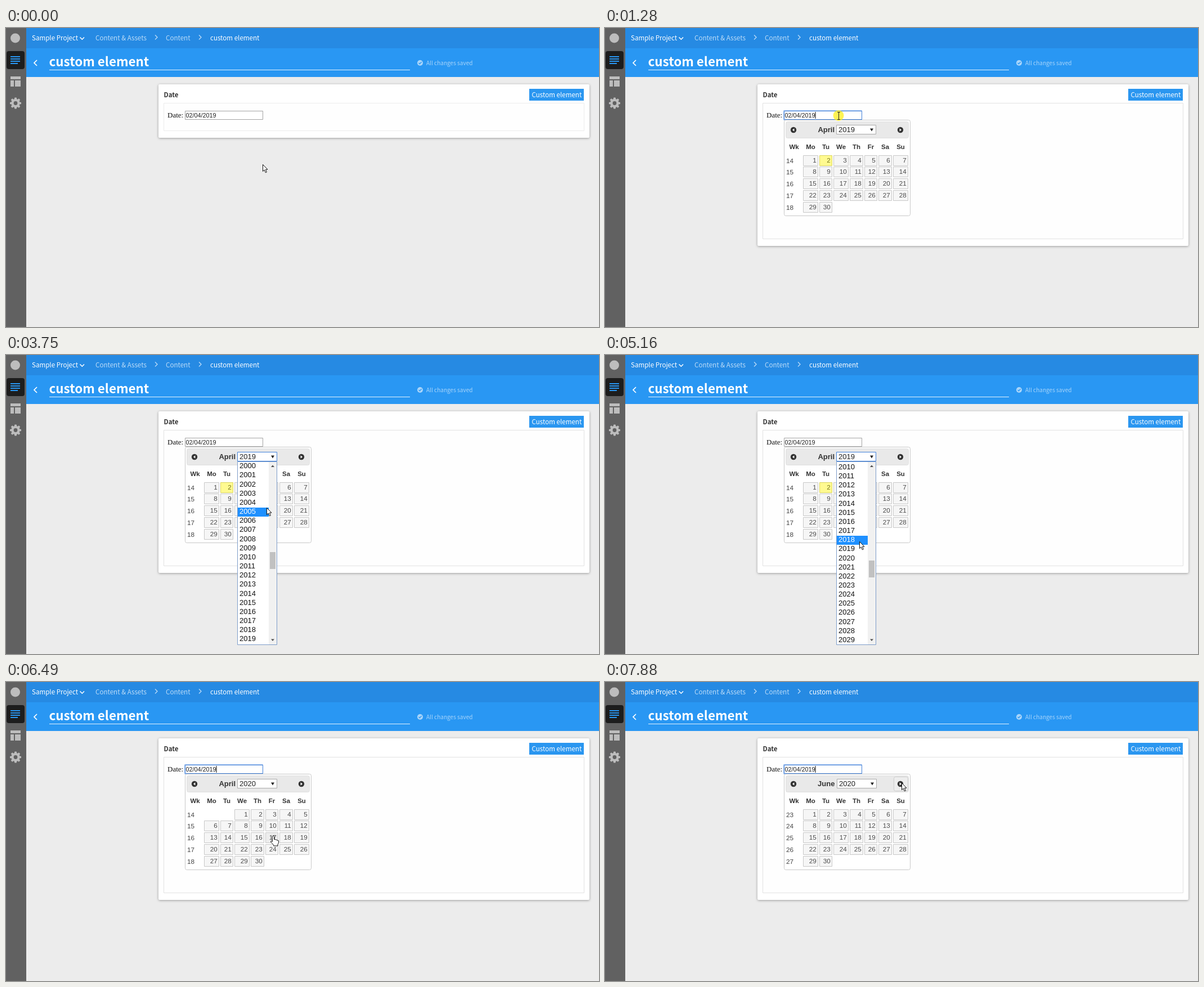
An HTML page with a canvas for the animation above (8 s loop, 1054 by 531 pixels).

```html
<!DOCTYPE html>
<html lang="en">
<head>
<meta charset="utf-8">
<title>Date picker</title>
<style>
html, body { margin: 0; width: 100%; height: 100%; overflow: hidden; background: #ececec; }
canvas { display: block; }
</style>
</head>
<body>
<canvas id="stage" width="1054" height="531"></canvas>
<script>
const ctx = document.getElementById('stage').getContext('2d');
const LOOP = 8000;
const UI = '"Noto Sans CJK JP", "Noto Sans CJK SC", "Noto Sans CJK", "Open Sans", sans-serif';
const ARIAL = '"Liberation Sans", Arial, sans-serif';
const SERIF = '"Liberation Serif", "Times New Roman", serif';
const BLUE = '#2997f3', FOCUS = '#3f7fd8', ICON = '#bdbdbd';

// lead: empty cells before day 1, week: first week number
const MONTHS = [
  { from: 1280, name: 'April', year: 2019, lead: 0, days: 30, week: 14, today: 2 },
  { from: 6180, name: 'April', year: 2020, lead: 2, days: 30, week: 14 },
  { from: 7580, name: 'May', year: 2020, lead: 4, days: 31, week: 18 },
  { from: 7880, name: 'June', year: 2020, lead: 0, days: 30, week: 23 }
];
// left edge, width and label of each weekday column
const COLUMNS = [[352, 27, 'Mo'], [381, 23, 'Tu'], [406, 27, 'We'], [435, 24, 'Th'],
  [461, 23, 'Fr'], [486, 24, 'Sa'], [512, 27, 'Su']];

const EASE = {
  in: p => p * p,
  out: p => p * (2 - p),
  both: p => p * p * (3 - 2 * p)
};
// time, x, y, easing on the way there
const MOUSE = [[0, 456, 242], [280, 456, 242], [1070, 415, 156, 'both'], [1130, 415, 155],
  [1980, 415, 155], [2420, 471, 177, 'both'], [3390, 471, 177], [3750, 463, 271, 'both'],
  [3930, 462, 273, 'out'], [4760, 462, 273], [5160, 452, 331, 'in'], [5480, 448, 357, 'out'],
  [5570, 449, 361, 'out'], [6180, 449, 361], [6490, 475, 273, 'in'], [6980, 527, 180, 'out'],
  [7190, 526.5, 179, 'both'], [LOOP, 526.5, 179]];
// time, duration
const CLICKS = [[1280, 100], [2690, 150], [7350, 230], [7660, 220]];

function mouseAt(t) {
  const i = MOUSE.findIndex(k => k[0] > t);
  const [t0, x0, y0] = MOUSE[i - 1], [t1, x1, y1, ease] = MOUSE[i];
  const p = EASE[ease || 'both']((t - t0) / (t1 - t0));
  return { x: x0 + (x1 - x0) * p, y: y0 + (y1 - y0) * p };
}

const inside = (m, x, y, w, h) => m.x >= x && m.x < x + w && m.y >= y && m.y < y + h;

function rect(x, y, w, h, fill) {
  ctx.fillStyle = fill;
  ctx.fillRect(x, y, w, h);
}

function box(x, y, w, h, fill, stroke, radius = 0) {
  ctx.beginPath();
  ctx.roundRect(x + .5, y + .5, w - 1, h - 1, radius);
  ctx.fillStyle = fill;
  ctx.fill();
  ctx.strokeStyle = stroke;
  ctx.lineWidth = 1;
  ctx.stroke();
}

function disc(x, y, r, fill) {
  ctx.beginPath();
  ctx.arc(x, y, r, 0, Math.PI * 2);
  ctx.fillStyle = fill;
  ctx.fill();
}

function text(s, x, y, font, color, align = 'left') {
  ctx.font = font;
  ctx.fillStyle = color;
  ctx.textAlign = align;
  ctx.fillText(s, x, y);
}

function line(points, color, width) {
  ctx.beginPath();
  points.forEach(p => ctx.lineTo(...p));
  ctx.strokeStyle = color;
  ctx.lineWidth = width;
  ctx.stroke();
}

function polygon(points, fill) {
  ctx.beginPath();
  points.forEach(p => ctx.lineTo(...p));
  ctx.fillStyle = fill;
  ctx.fill();
}

function drawSidebar() {
  rect(0, 0, 36, 531, '#616161');
  disc(16.5, 18, 8.5, ICON);
  box(1, 41, 32, 32, '#1d1d1d', '#1d1d1d', 3);
  [[50, 17], [54, 17], [58, 17], [62, 13]].forEach(([y, w]) => rect(8, y, w, 2, BLUE));
  rect(8, 86, 18, 5, ICON);
  rect(8, 93, 6, 11, ICON);
  rect(16, 93, 10, 11, ICON);
  ctx.save();
  ctx.translate(17, 133.5);
  for (let i = 0; i < 8; i++) {
    polygon([[-2.6, -6], [-1.6, -10], [1.6, -10], [2.6, -6]], ICON);
    ctx.rotate(Math.PI / 4);
  }
  ctx.beginPath();
  ctx.arc(0, 0, 5.4, 0, Math.PI * 2);
  ctx.strokeStyle = ICON;
  ctx.lineWidth = 4;
  ctx.stroke();
  ctx.restore();
}

function drawHeader() {
  rect(36, 0, 1018, 36, '#268ae3');
  rect(36, 36, 1018, 51, BLUE);
  const font = '11.6px ' + UI, pale = '#bcdcf8';
  text('Sample Project', 46, 21.5, font, '#fff');
  line([[131.5, 16.5], [135.3, 20.3], [139, 16.5]], '#fff', 1.5);
  text('Content & Assets', 159, 21.5, font, pale);
  text('Content', 284, 21.5, font, pale);
  text('custom element', 363, 21.5, font, '#fff');
  [265, 343].forEach(x => line([[x, 12.5], [x + 4, 16.5], [x, 20.5]], pale, 1.3));
  line([[55, 57], [50, 62], [55, 67]], '#fff', 1.7);
  text('custom element', 76.5, 68, 'bold 22.4px ' + UI, '#fff');
  rect(77, 74, 641, 1, '#e4f2fe');
  disc(736, 62, 5, '#a9d5fa');
  line([[733.6, 62], [735.4, 63.8], [738.6, 60.3]], BLUE, 1.3);
  text('All changes saved', 747, 66, '10.05px ' + UI, '#a9d5fa');
}

function drawCard(open, focused, caret) {
  ctx.save();
  ctx.shadowColor = 'rgba(0,0,0,.35)';
  ctx.shadowBlur = 4;
  ctx.shadowOffsetY = 1;
  ctx.beginPath();
  ctx.roundRect(271, 100, 766, open ? 287 : 95, 2);
  ctx.fillStyle = '#fff';
  ctx.fill();
  ctx.restore();
  text('Date', 280.5, 122.5, 'bold 11.4px ' + UI, '#333');
  rect(930, 108, 97, 21, '#2a96f0');
  text('Custom element', 934.5, 123, '11.6px ' + UI, '#fff');
  box(280, 133, 748, open ? 242 : 50, '#fefefe', open ? '#e2e2e2' : '#ececec');
  text('Date:', 287, 159, '13px ' + SERIF, '#111');
  if (focused) box(317, 146, 140, 18, '#fff', '#a9c6f0');
  box(318, 147, 139, 16, '#fff', focused ? FOCUS : '#a3a3a3');
  text('02/04/2019', 319.5, 158.5, '10.8px ' + ARIAL, '#222');
  if (caret) rect(373.5, 149, 1, 12, '#000');
}

function drawArrowButton(x, dir) {
  disc(x, 181, 5.2, '#333');
  polygon([[x - dir * 1.4, 178.2], [x + dir * 2, 181], [x - dir * 1.4, 183.8]], '#fff');
}

function drawCalendar(month, mouse, listOpen, selectFocused) {
  box(318, 163, 225, 171, '#fff', '#c8c8c8', 3);
  box(321, 166, 219, 30, '#e9e9e9', '#dfdfdf', 3);
  if (inside(mouse, 513, 168, 26, 26)) box(513, 168, 26, 26, '#ededed', '#cdcdcd', 3);
  drawArrowButton(335, -1);
  drawArrowButton(525, 1);

  const titleFont = 'bold 13px ' + ARIAL;
  ctx.font = titleFont;
  const nameWidth = ctx.measureText(month.name).width;
  const left = 430 - (nameWidth + 73.6) / 2;
  const selectX = Math.round(left + nameWidth + 3.2);
  text(month.name, left, 185.3, titleFont, '#333');
  box(selectX, 172, 71, 17, '#fff', selectFocused ? FOCUS : '#a9a9a9');
  text(month.year, selectX + 4, 185, '13px ' + ARIAL, '#222');
  polygon([[selectX + 60, 178.5], [selectX + 66, 178.5], [selectX + 63, 183.5]], '#222');

  const bold = 'bold 11.5px ' + ARIAL, plain = '11.7px ' + ARIAL;
  text('Wk', 336, 215, bold, '#333', 'center');
  COLUMNS.forEach(([x, w, name]) => text(name, x + w / 2, 215, bold, '#333', 'center'));
  const rowY = r => Math.round(225.6 + 20.8 * r);
  for (let r = 0; r * 7 < month.lead + month.days; r++) {
    text(month.week + r, 322, rowY(r) + 14, plain, '#444');
  }
  for (let day = 1; day <= month.days; day++) {
    const cell = day + month.lead - 1;
    const [x, w] = COLUMNS[cell % 7], y = rowY(Math.floor(cell / 7));
    const today = day === month.today;
    const hover = !listOpen && inside(mouse, x, y, w, 19);
    box(x, y, w, 19, today ? '#fffa90' : hover ? '#ededed' : '#f6f6f6', today ? '#dad55e' : '#c8c8c8');
    text(day, x + w - 3.2, y + 13.2, plain, today ? '#777620' : '#4a4a4a', 'right');
  }
}

function drawYearList(t, mouse) {
  const scroll = t < 3840 ? 0 : t < 3930 ? 80 : 160;
  const rowH = 16.16, top = 190 - scroll;
  const hovered = mouse.y >= 190 ? 2000 + Math.floor((mouse.y - top) / rowH) : 2019;
  box(411, 189, 71, 326, '#fff', '#7d9cc9');
  ctx.save();
  ctx.beginPath();
  ctx.rect(412, 190, 69, 324);
  ctx.clip();
  for (let year = 2000; year < 2031; year++) {
    const y = top + (year - 2000) * rowH;
    if (year === hovered) rect(412, Math.round(y), 56, 16, '#1e90ff');
    text(year, 415, y + 11.3, '13px ' + ARIAL, year === hovered ? '#fff' : '#111');
  }
  rect(467, 190, 14, 324, '#f1f1f1');
  rect(469, 350 + scroll * 15 / 160, 10, 30, '#c1c1c1');
  polygon([[471, 199], [477, 199], [474, 195.5]], '#505050');
  polygon([[471, 504.5], [477, 504.5], [474, 508]], '#505050');
  ctx.restore();
}

const ARROW = new Path2D('M.5 .5V12.6L3.3 10L5.3 14.8L7.4 13.9L5.4 9.2H9Z');
const HAND = new Path2D('M-1.6 1Q0 -1.2 1.6 1V6.4L4 6.6L4.4 7.2L6.6 7.4L7 8L9.4 8.8V13L8 15.5V18H.6V16.4' +
  'L-4.4 11Q-4.6 8.8 -2.8 9.3L-1.6 10.6Z');

function drawPointer(mouse, open, listOpen) {
  const x = Math.round(mouse.x), y = Math.round(mouse.y);
  if (inside(mouse, 318, 147, 139, 16)) {
    line([[x + .5, y - 5], [x + .5, y + 7]], '#222', 1);
    [y - 5.5, y + 7.5].forEach(v => line([[x - 2, v], [x + 3, v]], '#222', 1));
    return;
  }
  const overDays = open && !listOpen && inside(mouse, 352, 226, 187, 102);
  const shape = overDays ? HAND : ARROW;
  ctx.save();
  ctx.translate(x, y);
  ctx.fillStyle = '#fff';
  ctx.fill(shape);
  ctx.strokeStyle = '#111';
  ctx.lineWidth = 1;
  ctx.lineJoin = 'round';
  ctx.stroke(shape);
  ctx.restore();
}

function drawClick(t, mouse) {
  const click = CLICKS.find(([start, length]) => t >= start && t < start + length);
  if (!click) return;
  if (t - click[0] < 90 || click[1] <= 100) disc(mouse.x, mouse.y + .5, 9.5, 'rgba(255,238,20,.72)');
  else disc(mouse.x, mouse.y + 1, 31, 'rgba(255,238,20,.15)');
}

function draw(t) {
  const mouse = mouseAt(t);
  const month = MONTHS.filter(m => t >= m.from).pop();
  const open = !!month;
  const selectFocused = t >= 2690 && t < 6180;
  const listOpen = t >= 2790 && t < 6180;
  const focused = open && !selectFocused;
  const focusStart = t < 6180 ? 1290 : t < 7580 ? 6260 : 7580;
  const caret = focused && Math.floor(Math.max(0, t - focusStart) / 540) % 2 === 0;

  rect(0, 0, 1054, 531, '#ececec');
  drawSidebar();
  drawHeader();
  drawCard(open, focused, caret);
  if (open) drawCalendar(month, mouse, listOpen, selectFocused);
  if (listOpen) drawYearList(t, mouse);
  drawClick(t, mouse);
  drawPointer(mouse, open, listOpen);
}

function tick() {
  draw(performance.now() % LOOP);
  requestAnimationFrame(tick);
}
tick();
</script>
</body>
</html>
```
